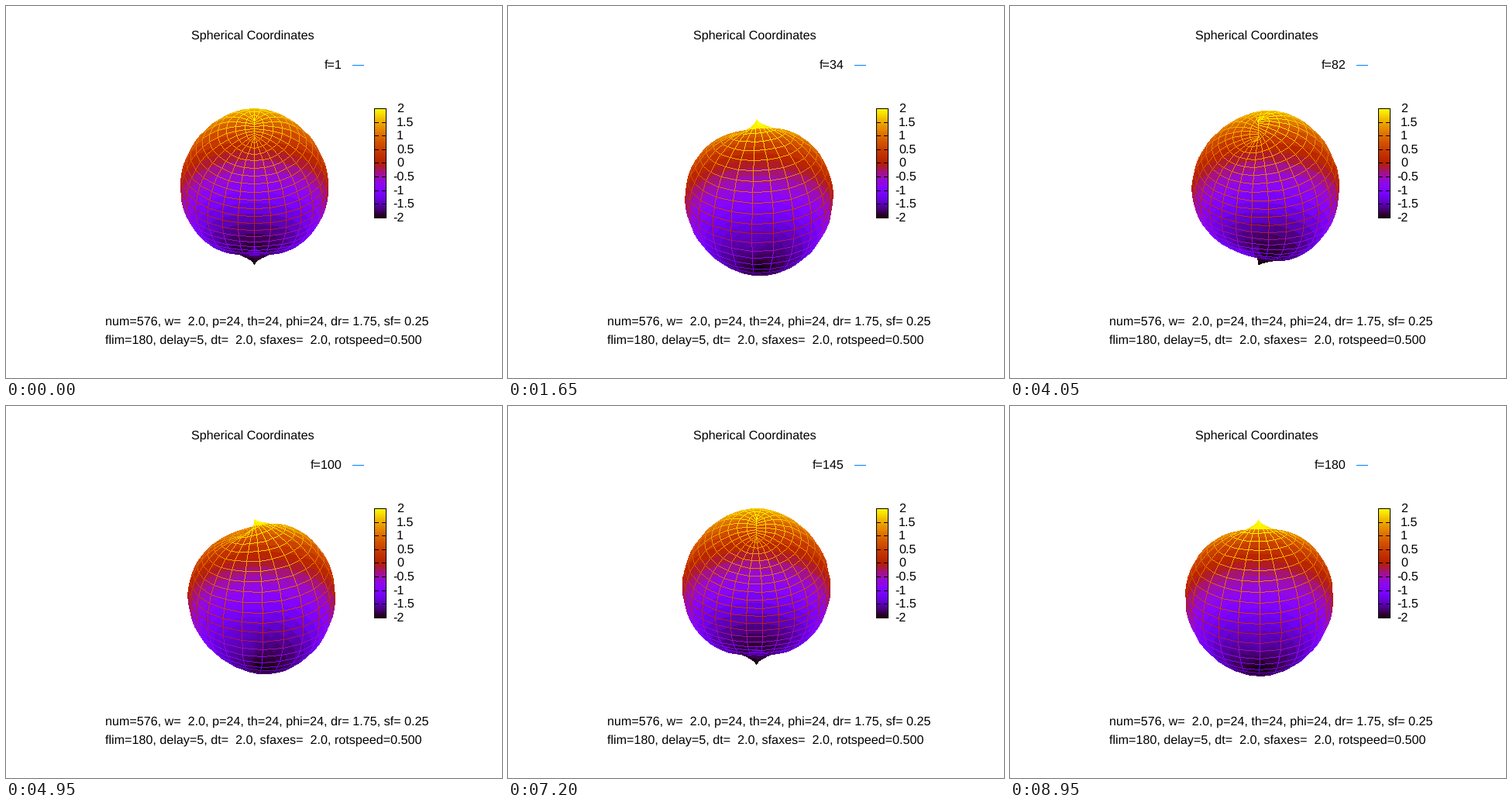
Write a matplotlib script that moves like this. It is 640 px wide and 480 px high and loops after 9 s.

```python
import numpy as np
import matplotlib
import matplotlib.pyplot as plt
from matplotlib.animation import FuncAnimation
from matplotlib.collections import PolyCollection

matplotlib.rcParams.update({
    "font.family": "Liberation Sans",
    "text.hinting": "none",
})

W, H, DPI = 640, 480, 100
PX = 72 / DPI                     # one pixel in points
FRAMES, STEP_MS = 180, 50
N_TH, N_PHI = 24, 24
RADIUS, SWELL = 1.75, 0.25
UNIT = 54.0                       # pixels per unit of length
CX, CY = 320.5, 240.4
TILT = np.radians(60)
SIN, COS = np.sin(TILT), np.cos(TILT)
TO_EYE = np.array([0, -SIN, COS])
SUB = 3                           # visibility checks per mesh edge

# Square window that holds the wire pixels
LEFT, TOP, SIDE = 200, 120, 240

THETA = np.linspace(0, np.pi, N_TH + 1)[:, None]
PHI = np.linspace(0, 2 * np.pi, N_PHI + 1)[None, :]
MARCH = np.linspace(0.08, 1.7, 22)
STEPS = np.arange(40)[None, :]


def palette(z):
    """Black-violet-red-yellow ramp over the range -2..2."""
    t = np.clip((np.asarray(z) + 2) / 4, 0, 1)
    blue = np.clip(np.sin(2 * np.pi * t), 0, 1)
    return np.stack([np.sqrt(t), t ** 3, blue], axis=-1)


def surface(i):
    """Mesh points, shape (theta, phi, 3); y points away from the viewer."""
    phi = PHI + np.radians(i)
    r = RADIUS + SWELL * np.cos(phi - np.radians(5 * i))
    return np.stack([r * np.sin(THETA) * np.sin(phi),
                     r * np.sin(THETA) * np.cos(phi),
                     r * np.cos(THETA)], axis=-1)


def project(p):
    up = p[..., 2] * SIN + p[..., 1] * COS
    return np.stack([CX + UNIT * p[..., 0], CY - UNIT * up], axis=-1)


def is_visible(p, i):
    """March from each point to the eye and look for the solid in between."""
    bulge = np.radians(5 * i)
    q = p[..., None, :] + MARCH[:, None] * TO_EYE
    x, y, z = q[..., 0], q[..., 1], q[..., 2]
    flat = np.hypot(x, y) + 1e-9
    r = RADIUS + SWELL * (x * np.sin(bulge) + y * np.cos(bulge)) / flat
    return ~(np.hypot(flat, z) < r - 0.03).any(axis=-1)


def mesh_edges(p):
    rings = np.stack([p[:, :-1], p[:, 1:]], axis=2).reshape(-1, 2, 3)
    spokes = np.stack([p[:-1, :-1], p[1:, :-1]], axis=2).reshape(-1, 2, 3)
    return np.concatenate([rings, spokes])


def wire_image(p, i):
    """One-pixel hard lines along the visible mesh edges."""
    edges = mesh_edges(p)
    mid = (np.arange(SUB) + 0.5)[None, :, None] / SUB
    a, b = edges[:, :1], edges[:, 1:]
    seen = is_visible(a + mid * (b - a), i)

    ends = np.floor(project(edges))
    span = ends[:, 1] - ends[:, 0]
    count = np.maximum(np.abs(span).max(axis=1), 1)[:, None]
    t = np.minimum(STEPS / count, 1)
    dots = np.floor(ends[:, None, 0] + t[..., None] * span[:, None] + 0.5)
    part = np.minimum((t * SUB).astype(int), SUB - 1)
    show = np.take_along_axis(seen, part, axis=1)

    rgb = palette(edges[:, :, 2].mean(axis=1))
    rgb = np.broadcast_to(rgb[:, None], t.shape + (3,))[show]
    col, row = dots[show].astype(int).T - np.array([[LEFT], [TOP]])
    image = np.zeros((SIDE, SIDE, 4), np.uint8)
    image[row, col, :3] = np.round(255 * rgb)
    image[row, col, 3] = 255
    return image


fig = plt.figure(figsize=(W / DPI, H / DPI), dpi=DPI, facecolor="white")
ax = fig.add_axes([0, 0, 1, 1])
ax.axis("off")


def label(x, baseline, text, ha="left"):
    return ax.text(x, baseline, text, ha=ha, va="baseline",
                   fontsize=16.12 * PX, color="black")


def stroke(xs, ys, color="black"):
    ax.plot(xs, ys, color=color, lw=0.5 * PX, antialiased=False, snap=False,
            solid_capstyle="butt", solid_joinstyle="miter")


def color_box(left, right, top, bottom):
    ramp = palette(np.linspace(2, -2, 128))[:, None, :]
    ax.imshow(ramp, extent=(left - 0.5, right + 0.5, bottom + 0.5, top - 0.5),
              aspect="auto", interpolation="nearest")
    stroke([left, right, right, left, left], [top, top, bottom, bottom, top])
    for k in range(9):
        value = 2 - k / 2
        y = round(top + (bottom - top) * k / 8 - 0.5) + 0.5
        stroke([left, left + 5], [y, y])
        stroke([right - 5, right], [y, y])
        label(499.5 if value < 0 else 503.9, y + 4.3, f"{value:g}")


color_box(475.5, 490.5, 132.5, 273.5)
label(318.5, 43, "Spherical Coordinates", "center")
label(127.5, 412, "num=576, w=  2.0, p=24, th=24, phi=24, dr= 1.75, sf= 0.25")
label(127.5, 436, "flim=180, delay=5, dt=  2.0, sfaxes=  2.0, rotspeed=0.500")
stroke([447, 462], [76.5, 76.5], "#0080ff")
counter = label(433.5, 81, "", "right")

skin = PolyCollection([], edgecolors="none", antialiaseds=False, zorder=3)
ax.add_collection(skin)
wires = ax.imshow(np.zeros((SIDE, SIDE, 4), np.uint8), zorder=4,
                  extent=(LEFT, LEFT + SIDE, TOP + SIDE, TOP),
                  aspect="auto", interpolation="nearest")
ax.set_xlim(0, W)
ax.set_ylim(H, 0)


def draw(i):
    p = surface(i)
    # Rings are painted from top to bottom, so the far wall covers the near one.
    quads = np.stack([p[:-1, :-1], p[:-1, 1:], p[1:, 1:], p[1:, :-1]], axis=2)
    quads = quads.reshape(-1, 4, 3)
    skin.set_verts(project(quads))
    skin.set_facecolor(palette(quads[:, :, 2].mean(axis=1)))
    wires.set_data(wire_image(p, i))
    counter.set_text(f"f={i + 1}")
    return skin, wires, counter


anim = FuncAnimation(fig, draw, frames=FRAMES, interval=STEP_MS,
                     init_func=lambda: draw(0), repeat=True, repeat_delay=0,
                     blit=False)
plt.show()
```
